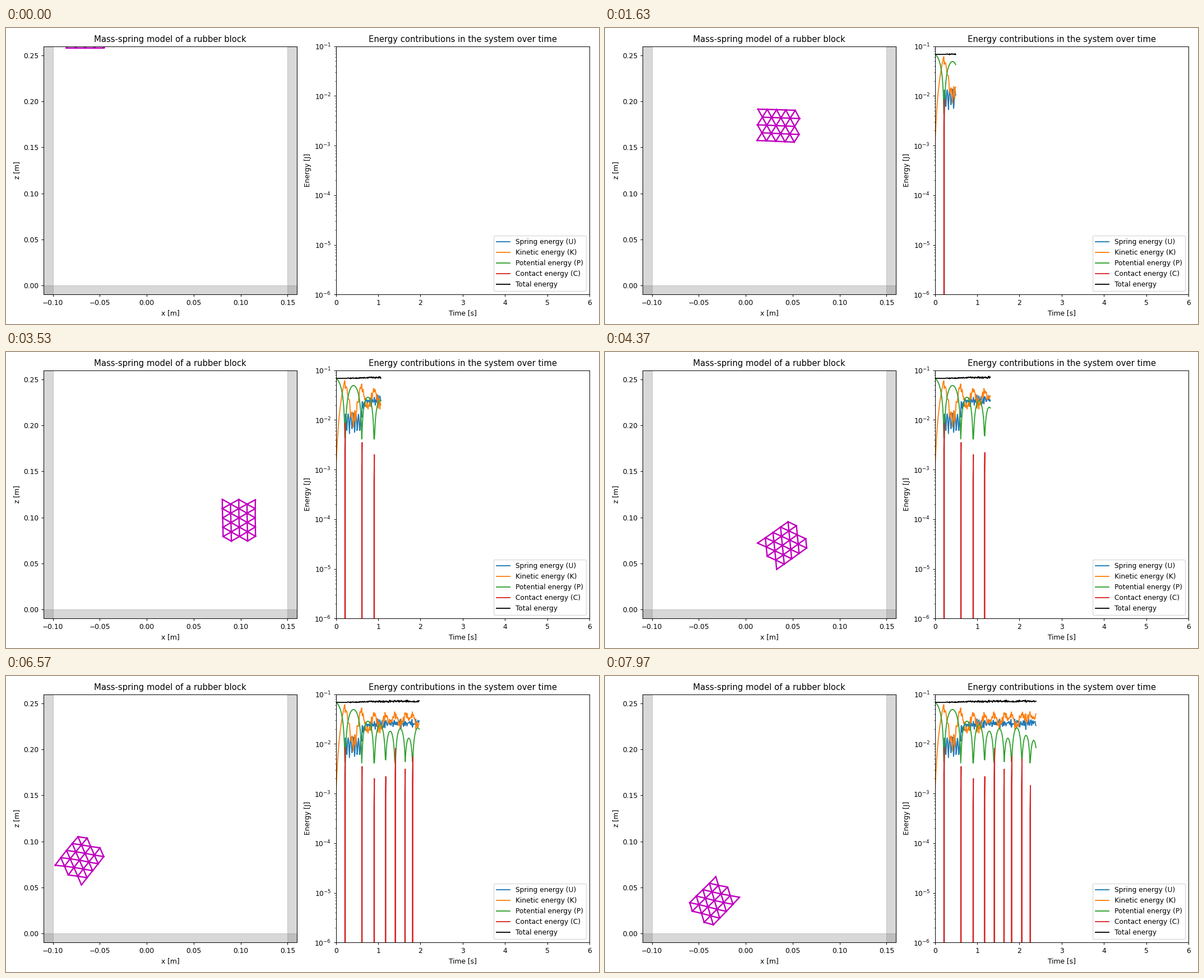
A matplotlib script that plays this animation: 1058x529 px, repeating every 8000 ms.

```python
import numpy as np
import matplotlib.pyplot as plt
from matplotlib.animation import FuncAnimation

DPI = 88.1667  # 12 x 6 inches give 1058 x 529 pixels
STEP_MS, LOOP_MS = 25, 8000
RATE, DT = 30, 0.01  # samples per second of playback, simulated step
SAMPLES = LOOP_MS * RATE // 1000
TIME = np.arange(SAMPLES) * DT
MASS, G = 0.025, 9.81
IMPACT = 0.215

# --- Mesh: 5 x 5 triangular lattice, odd rows shifted by half a cell ---
CELL = 0.01
ROW, COL = np.divmod(np.arange(25), 5)
REST = CELL * np.column_stack([COL + 0.5 * (ROW % 2) - 2.2,
                               np.sqrt(0.75) * (ROW - 2)])
SPRINGS = [(i, j) for i in range(25) for j in range(i)
           if np.hypot(*(REST[i] - REST[j])) < 1.05 * CELL]

# --- Flights between bounces: time and height of each apex ---
APEX_T, APEX_Z = np.array([
    (-0.020, 0.2773), (0.416, 0.2006), (0.756, 0.1168), (1.043, 0.0988),
    (1.285, 0.0735), (1.524, 0.0826), (1.725, 0.0533), (1.937, 0.0857),
    (2.155, 0.0606), (2.337, 0.0481)]).T
LOWEST = 0.0168


def centre(t):
    x = np.interp(t, [0, 0.944, 1.838, 2.39],
                  [-0.0637, 0.1251, -0.0816, -0.0346])
    z = max(np.max(APEX_Z - G / 2 * (t - APEX_T) ** 2), LOWEST)
    return np.array([x, z])


def bounce_times():
    """Times at which neighbouring flight parabolas cross."""
    mid = (APEX_T[:-1] + APEX_T[1:]) / 2
    return mid - np.diff(APEX_Z) / (G * np.diff(APEX_T))


def turn(t):
    return np.radians(np.interp(
        t, [0.21, 0.61, 0.91, 1.06, 1.2, 1.635, 1.82, 2.39],
        [0, -2.6, 77, 270, 380, 440, 350, 587]))


# --- Vibration: a few seeded standing waves across the block ---
rng = np.random.default_rng(4)
MODES = [(rng.normal(size=2), rng.uniform(-90, 90, 2),
          rng.uniform(12, 24), rng.uniform(0, 2 * np.pi)) for _ in range(4)]


def wobble(t):
    size = np.interp(t, [IMPACT, IMPACT + 0.02, 0.6, 0.7],
                     [0, 0.0003, 0.0003, 0.0005])
    waves = [np.outer(np.sin(REST @ wave + phase), way)
             * np.cos(2 * np.pi * freq * t + phase)
             for way, wave, freq, phase in MODES]
    return size * np.sum(waves, axis=0)


def nodes(t):
    """Node positions in metres at simulated time t."""
    c, s = np.cos(turn(t)), np.sin(turn(t))
    p = centre(t) + (REST + wobble(t)) @ np.array([[c, s], [-s, c]])
    return np.clip(p, [-0.102, -0.002], [0.152, 1])


def energies():
    noise = np.clip(rng.normal(size=(2, SAMPLES)), -1.9, 1.9)
    pot = MASS * G * np.array([centre(t)[1] for t in TIME])

    contact = np.zeros(SAMPLES)
    peaks = [8.5, 3.5, 2, 2.2, 8.1, 3.1, 5.5, 5, 1.45]  # mJ
    for t, peak in zip(bounce_times(), peaks):
        n = int(t / DT)
        contact[n:n + 2] = 0.3e-3 * peak, 1e-3 * peak

    first = 0.0098 + 0.0038 * np.cos(2 * np.pi * (TIME - 0.225) / 0.062)
    later = (np.interp(TIME, [0.6, 1.2], [0.022, 0.026])
             + 0.0025 * np.sin(2 * np.pi * TIME / 0.047))
    spring = np.where(TIME < 0.615, first + 0.0006 * noise[0],
                      later + 0.0022 * noise[0])
    spring[TIME < IMPACT] = 0

    spread = np.interp(TIME, [IMPACT, 0.3, 1.2], [0, 0.0008, 0.0019])
    total = (np.interp(TIME, [IMPACT, 1.2], [0.0685, 0.0724])
             + spread * noise[1])
    floor = np.where(TIME < IMPACT, 0, 0.0072)
    kinetic = np.maximum(total - spring - pot - contact, floor)
    return [spring, kinetic, pot, contact, total]


ENERGY = energies()

# --- Figure ---
fig, (block_ax, energy_ax) = plt.subplots(1, 2, figsize=(12, 6), dpi=DPI)

block_ax.set(xlim=(-0.11, 0.16), ylim=(-0.01, 0.26),
             xlabel="x [m]", ylabel="z [m]",
             title="Mass-spring model of a rubber block")
wall = dict(color="gray", alpha=0.3)
block_ax.axvspan(-0.11, -0.10, **wall)
block_ax.axvspan(0.15, 0.16, **wall)
block_ax.axhspan(-0.01, 0, **wall)
mesh, = block_ax.plot([], [], color="m", lw=2)

energy_ax.set(xlim=(0, 6), yscale="log", ylim=(1e-6, 1e-1),
              xlabel="Time [s]", ylabel="Energy [J]",
              title="Energy contributions in the system over time")
LABELS = {"Spring energy (U)": "C0", "Kinetic energy (K)": "C1",
          "Potential energy (P)": "C2", "Contact energy (C)": "C3",
          "Total energy": "k"}
curves = [energy_ax.plot([], [], color=color, label=label)[0]
          for label, color in LABELS.items()]
energy_ax.legend(loc="lower right")
fig.tight_layout()


def update(frame):
    # samples last 33.3 ms, so pick the one nearest to the middle of the frame
    n = int((frame * STEP_MS + 21) * RATE / 1000)
    p = nodes(TIME[n])
    gap = [np.nan, np.nan]
    path = np.array([q for i, j in SPRINGS for q in (p[i], p[j], gap)])
    mesh.set_data(path.T)
    for curve, energy in zip(curves, ENERGY):
        curve.set_data(TIME[:n + 1], energy[:n + 1])
    return [mesh, *curves]


anim = FuncAnimation(fig, update, frames=LOOP_MS // STEP_MS, interval=STEP_MS,
                     init_func=lambda: update(0), repeat=True, repeat_delay=0)
plt.show()
```
